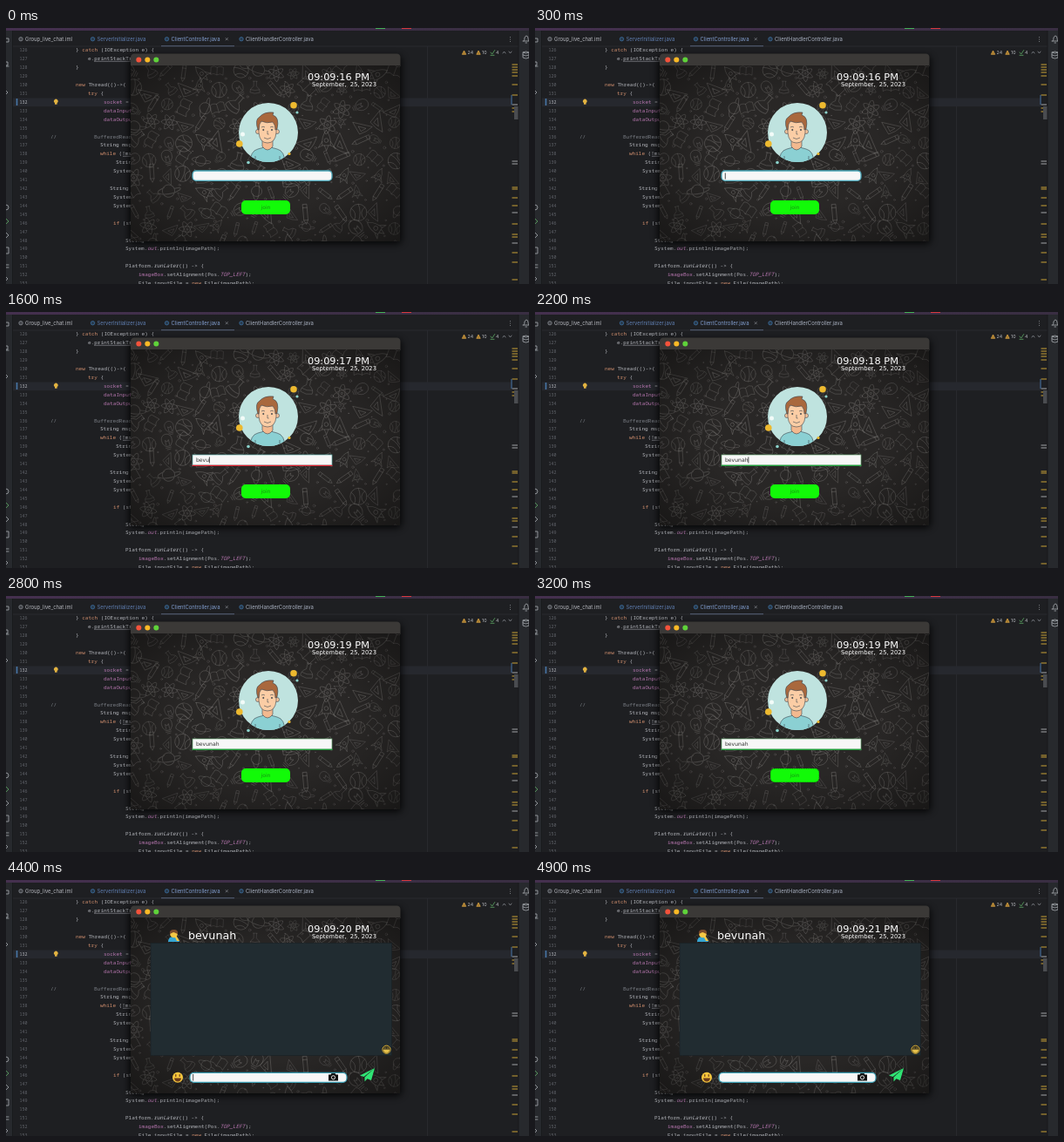
Write an HTML page that moves like this. It is 600 by 294 pixels and loops after 5 s.

```html
<!DOCTYPE html>
<html lang="en">
<head>
<meta charset="utf-8">
<title>Group chat login</title>
<style>
  html, body { margin: 0; width: 100%; height: 100%; overflow: hidden; background: #1e1f22; }
  svg { display: block; width: 600px; height: 294px; }
  text { white-space: pre; }
  .code { font: 6px "Noto Sans Mono", monospace; fill: #b4b6bc; }
  .num { font: 5px "Noto Sans Mono", monospace; fill: #62656c; text-anchor: end; }
  .current { fill: #b4b6bc; }
  .comment { fill: #7a7e85; }
  .kw { fill: #cf8e6d; }
  .field { fill: #b877b0; }
  .static { font-style: italic; fill: #b877b0; }
  .call { font-style: italic; }
  .tab { font: 5.9px Inter, sans-serif; }
  .count { font: 5.3px Inter, sans-serif; fill: #b4b6bc; }
  .app { font-family: "DejaVu Sans", sans-serif; fill: #fff; }
  .line { fill: none; stroke-linecap: round; stroke-linejoin: round; }
</style>
</head>
<body>
<svg viewBox="0 0 600 294">
  <defs>
    <linearGradient id="strip"><stop stop-color="#45304f"/><stop offset="1" stop-color="#392e42"/></linearGradient>
    <radialGradient id="vignette" r=".7"><stop offset=".45" stop-opacity="0"/><stop offset="1" stop-opacity=".4"/></radialGradient>
    <filter id="blur" x="-10%" y="-10%" width="120%" height="120%"><feGaussianBlur stdDeviation="4"/></filter>
    <clipPath id="body"><rect x="143" y="43" width="309" height="202"/></clipPath>
    <clipPath id="disc"><circle cx="301" cy="120" r="34"/></clipPath>
  </defs>

  <!-- editor -->
  <rect width="600" height="294" fill="#1e1f22"/>
  <rect width="600" height="3" fill="url(#strip)"/>
  <path d="M424 0h11v1h-11z" fill="#45b058"/>
  <path d="M454 0h11v1h-11z" fill="#d8383f"/>
  <path d="M8 21H588M483.5 21V294" stroke="#2d2f34" stroke-width=".7"/>
  <path d="M178 20.7H262" stroke="#4c5568" stroke-width="1.2"/>
  <rect x="8" y="80.5" width="572" height="9.6" fill="#26282e"/>
  <path d="M0 3H7.5V294H0ZM588 3h12V294h-12z" fill="#27292d"/>
  <path d="M7.500 3V294M588 3V294" stroke="#17181a" stroke-width=".8"/>
  <path d="M12.5 81v8" stroke="#4877a8" stroke-width="1.6"/>
  <path d="M56 86a2.300 2.300 0 1 1 2.600 0v1.800h-2.600z" fill="#e3b341"/>
  <g class="line" stroke="#a9acb2" stroke-width=".8">
    <path d="M0 12h3v4h-3M0 39h2v4h-2M0 44h3M0 72l2 2-2 2M0 203a3 3 0 0 1 0 6M0 235l3 3-3 3M0 252h3v7h-3M0 272h3M0 275h3M0 286l2 2-2 2"/>
    <path d="M0 219l3 3-3 3" stroke="#5fad65"/>
    <path d="M593 15h7M594 15q1-1 1-4q1-2 2-2q2 0 2 3q0 2 1 3M596 17h1.5"/>
    <path d="M593 28v6q3.5 2 7 0v-6q-3.5 2-7 0q3.5-2 7 0M593 31q3.5 2 7 0"/>
    <path d="M578.500 10.500v0M578.500 13v0M578.500 15.500v0"/>
  </g>
  <g class="line" stroke-width=".8">
    <path d="M523.5 30l2-4 2 4zM540 30l2-4 2 4z" stroke="#d9a343" fill="#a57a2e"/>
    <path d="M556 28l1.7 2 3-4.500M556 31.300h4" stroke="#5fad65"/>
    <path d="M570 29l1.500-2 1.500 2M577 27l1.500 2 1.500-2" stroke="#888b92"/>
  </g>
  <g class="count">
    <text x="529.5" y="30">24</text><text x="546" y="30">10</text><text x="562" y="30">4</text>
  </g>
  <g id="tabs"></g>
  <g id="marks"></g>
  <g id="code"></g>

  <!-- application window -->
  <rect x="141" y="32" width="313" height="216" rx="5" filter="url(#blur)" opacity=".8"/>
  <path d="M143 44V34q0-4.500 4.500-4.500H448q4.500 0 4.500 4.500v10z" fill="#3b3937"/>
  <circle cx="152.300" cy="36.600" r="3" fill="#f4523b"/>
  <circle cx="162.300" cy="36.600" r="3" fill="#fbb926"/>
  <circle cx="172.300" cy="36.600" r="3" fill="#5fd23a"/>
  <g clip-path="url(#body)">
    <rect x="143" y="43" width="310" height="203" fill="#292726"/>
    <g id="doodles" class="line" stroke="#969390" stroke-opacity=".34"></g>
    <rect x="143" y="43" width="310" height="203" fill="url(#vignette)"/>
  </g>
  <text id="clock" class="app" x="346" y="60.100" font-size="11.300"></text>
  <text class="app" x="351" y="67.400" font-size="6.770">September,  25, 2023</text>

  <g id="login">
    <circle cx="301" cy="120" r="34" fill="#bfe3df"/>
    <g clip-path="url(#disc)" stroke="#3b4650" stroke-width=".6" stroke-linejoin="round">
      <path d="M280 156q0-15 9-17l11-3 11 3q9 2 9 17z" fill="#8bd0d3"/>
      <path d="M294 126v10q6 8 12 0v-10z" fill="#f3b98f"/>
      <path d="M286 147v8M314 147v8" fill="none"/>
      <circle cx="289" cy="119" r="2.5" fill="#f7c59c"/><circle cx="311" cy="119" r="2.5" fill="#f7c59c"/>
      <path d="M290 108q10-5 20 0v12q-1 12-10 12t-10-12z" fill="#fbcda5"/>
      <path d="M289 117q-4-12 2-15q5-6 16-5l-1 3q8 2 5 16l-2 1q0-6-3-9q-7 2-13-1q-3 3-3 10z" fill="#a9683d"/>
      <path d="M293 114q2-1.500 4 0M303 114q2-1.500 4 0M300 118v4h1.500M296 126q4 3 8 0" fill="none"/>
      <circle cx="295.300" cy="117" r=".7" fill="#333"/><circle cx="305" cy="117" r=".7" fill="#333"/>
    </g>
    <g fill="#edb92f">
      <circle cx="330" cy="88.700" r="3.800"/><circle cx="267.800" cy="133" r="3.800"/><circle cx="325" cy="144.500" r="1.600"/>
    </g>
    <g fill="#8cd3cc"><circle cx="334" cy="97" r="1.600"/><circle cx="278" cy="154.500" r="1.800"/></g>
    <circle cx="271.500" cy="122" r="2.500" fill="#f2fbf8"/>
    <rect id="box" x="214" y="164" width="160" height="12" fill="#f7f7f7"/>
    <path id="underline" d="M213.500 176.300H374.500" stroke-width="1.300"/>
    <text id="typed" class="app" x="218" y="172.200" font-size="6.100" style="fill:#333"></text>
    <path id="caret" d="M0 166.500v7" stroke="#222" stroke-width=".8"/>
    <rect x="270" y="198" width="56" height="16" rx="5" fill="#12fa08"/>
    <rect id="focus" x="270.300" y="198.300" width="55.400" height="15.400" rx="4.700" fill="none" stroke="#0b6d0a" stroke-width=".7" stroke-dasharray="1 1"/>
    <text class="app" x="298" y="208" font-size="6" text-anchor="middle" style="fill:#179014">join</text>
  </g>

  <g id="chat">
    <rect x="166" y="72.500" width="276.500" height="129" fill="#212c31" stroke="#182125" stroke-width=".6"/>
    <path d="M186 71q0-6 6-6t7 6z" fill="#35a6d4"/>
    <circle cx="192.500" cy="62" r="4.300" fill="#f5c744"/>
    <path d="M188 62q-1-5 4.500-5t4.500 5q-4-2-5-2z" fill="#7b4a2a"/>
    <path d="M199 70l-4-7-2 1 3 6z" fill="#f5c744"/>
    <text id="user" class="app" x="209" y="68" font-size="12.700"></text>
    <circle cx="436.500" cy="194.700" r="4.600" fill="#3c3620" stroke="#d8ae36"/>
    <path d="M433 195h7q-1 3.500-3.500 3.500t-3.500-3.500zM434 193h1.500M437.500 193h1.500" fill="#e5c04b" stroke="#e5c04b" stroke-width=".7"/>
    <circle cx="197" cy="226.700" r="6" fill="#f7c63d"/>
    <path d="M193 227.500h8q-.5 4-4 4t-4-4z" fill="#6b3c1b"/>
    <path d="M194.800 223.500v2M199.200 223.500v2" stroke="#6b3c1b" stroke-width="1.200" stroke-linecap="round"/>
    <rect x="211" y="221.300" width="180" height="11" rx="4.500" fill="#f7f7f7" stroke="#3c9fb4" stroke-width="1.200"/>
    <path id="chatCaret" d="M214.700 223v7.500" stroke="#222" stroke-width=".8"/>
    <path d="M370 223.500h2.500l1-1.500h4l1 1.500h2.500v7h-11z" fill="#111"/>
    <circle cx="375.500" cy="226.800" r="2.100" fill="none" stroke="#f7f7f7" stroke-width=".9"/>
    <path d="M423 216L406 224.500l4.500 1.500zM423 216l-11.500 10.500v5l3-3.300 4.500 1.800z" fill="#2fe574"/>
  </g>
</svg>

<script>
const $ = id => document.getElementById(id);
const LOOP = 5000;
const NAME = "bevunah";
const KEY_TIMES = [1200, 1300, 1500, 1600, 1800, 1900, 2200];
const VALID_LENGTH = 5;
const CHAT_START = 3500;

// [line number, x, text]
const CODE = [
  [126, 80, "} catch (IOException e) {"], [127, 94, "e.printStackTrace();"], [128, 80, "}"],
  [130, 80, "new Thread(()->{"], [131, 94, "try {"], [132, 112, "socket = new Socket"],
  [133, 112, "dataInputStream"], [134, 112, "dataOutputStream"], [136, 51, "//"],
  [136, 101, "BufferedReader"], [137, 108, "String msg = "], [138, 108, "while (!msg.equals"],
  [139, 126, "String"], [140, 123, "System"], [142, 119, "String"], [143, 123, "System"],
  [144, 123, "System"], [146, 123, "if (st"], [148, 137, "String"],
  [149, 137, "System.out.println(imagePath);"], [151, 137, "Platform.runLater(() -> {"],
  [152, 152, "imageBox.setAlignment(Pos.TOP_LEFT);"],
  [153, 152, "File inputFile = new File(imagePath);"]
];
const STYLES = {
  kw: /^(catch|new|try|while|if)$/,
  field: /^(socket|data\w+|imageBox)$/,
  static: /^(out|TOP_LEFT)$/,
  call: /^runLater$/
};
const lineY = n => 27.3 + (n - 126) * 9.92;
const highlight = text => text.replace(/\w+/g, word => {
  const style = Object.keys(STYLES).find(k => STYLES[k].test(word));
  return style ? `<tspan class="${style}">${word}</tspan>` : word;
});

let lines = "";
for (let n = 126; n <= 153; n++)
  lines += `<text class="num" x="24.5" y="${lineY(n)}"><tspan class="${n === 132 ? "current" : ""}">${n}</tspan></text>`;
for (const [n, x, text] of CODE)
  lines += `<text class="code" x="${x}" y="${lineY(n)}"><tspan class="${n === 136 ? "comment" : ""}">${highlight(text)}</tspan></text>`;
$("code").innerHTML = lines + '<path d="M101 38.3h42M134 147.3h9" stroke="#b4b6bc" stroke-width=".5"/>';

const TABS = [
  [22, "Group_live_chat.iml", "#b4b6bc", "#85888f"], [104.5, "ServerInitializer.java", "#5f7eb0", "#3b6fa0"],
  [189.5, "ClientController.java", "#829fd0", "#3b6fa0"], [275, "ClientHandlerController.java", "#a9b1c0", "#3b6fa0"]
];
$("tabs").innerHTML = TABS.map(([x, label, color, icon]) =>
  `<circle cx="${x - 5}" cy="12.7" r="2.2" fill="${icon}" fill-opacity=".35" stroke="${icon}" stroke-width=".8"/>
   <text class="tab" x="${x}" y="14.9" fill="${color}">${label}</text>`).join("") +
  '<path d="M251.8 11.2l3 3m0-3l-3 3" stroke="#888b92" stroke-width=".7"/>';

const mark = color => y => `<path d="M580.5 ${y}h6.5" stroke="${color}"/>`;
$("marks").innerHTML =
  [42, 45, 48, 51, 55, 65, 77, 92, 96, 183, 185, 195, 204, 225, 237, 240, 258, 269, 289].map(mark("#c9a236")).join("") +
  [88, 153, 156, 212, 247].map(mark("#a3a5a8")).join("") +
  '<path d="M583 90h4.500v15h-4.500z" fill="#4a4c50"/><path d="M580 77v11" stroke="#4877a8"/>';

const ring = (rx, ry = rx, tilt = 0) => {
  const a = tilt * Math.PI / 180, x = rx * Math.cos(a), y = rx * Math.sin(a);
  const arc = `A${rx} ${ry} ${tilt} 1 1 `;
  return `M${x} ${y}${arc}${-x} ${-y}${arc}${x} ${y}`;
};
const DOODLES = [
  "M0-10Q5-4 4 5H-4Q-5-4 0-10ZM-4 1L-8 7L-4 5M4 1L8 7L4 5M-2 5L0 10L2 5" + ring(2),
  ring(6) + "M-5-2Q-14 6-6 5Q4 3 10-4Q12-8 5-4",
  "M-3 4Q-7 0-6-4A6 6 0 0 1 6-4Q7 0 3 4ZM-3 6H3M-2 8H2M-2 3V-3L0-1L2-3V3",
  ring(9, 3) + ring(9, 3, 60) + ring(9, 3, 120) + ring(1),
  "M-3-9H3M-2-9V-2Q-8 2-7 7Q0 10 7 7Q8 2 2-2V-9M-6 3Q0 5 6 3",
  "M-2-9V6L0 10L2 6V-9ZM-2-6H2M-2 6H2",
  "M-8 7Q0 9 8 7L-8-8ZM-5 5H1L-5-1Z",
  "M0-5Q-5-8-9-5V6Q-5 3 0 6Q5 3 9 6V-5Q5-8 0-5V6",
  ring(8) + "M-7-4Q-1 0-4 7M6-5Q0 0 5 6M0-8Q3 0 0 8"
];
let seed = 11;
const random = () => (seed = seed * 16807 % 2147483647) / 2147483647;
const between = (a, b) => a + (b - a) * random();
let doodles = "";
for (let row = 0; row < 11; row++)
  for (let col = 0; col < 16; col++) {
    const x = 146 + col * 20 + between(-4, 4), y = 50 + row * 20 + between(-4, 4);
    const shape = DOODLES[Math.floor(random() * DOODLES.length)];
    doodles += `<path d="${shape}" stroke-width=".8" transform="translate(${x} ${y}) rotate(${between(-70, 70)}) scale(${between(.75, 1.2)})"/>
      <circle cx="${x + 10}" cy="${y + 9}" r="${between(.4, 1.6)}" stroke-width=".6"/>`;
  }
$("doodles").innerHTML = doodles;
$("user").textContent = NAME;

const show = (id, visible) => $(id).setAttribute("display", visible ? "inline" : "none");
const setAttributes = (id, values) => {
  for (const key in values) $(id).setAttribute(key, values[key]);
};
const FIELD_STATES = {
  empty: { rx: 4, height: 11.3, stroke: "#4aa6b8", "stroke-width": 1.3 },
  invalid: { rx: 0, height: 12, stroke: "#5aa9a4", "stroke-width": .7 },
  valid: { rx: 0, height: 12, stroke: "#5f9f6a", "stroke-width": .7 }
};

function render(t) {
  $("clock").textContent = `09:09:${16 + Math.floor((t + 200) / 1000)} PM`;
  show("login", t < CHAT_START);
  show("chat", t >= CHAT_START);
  show("chatCaret", t < 3900 || (t >= 4400 && t < 4900));

  const count = KEY_TIMES.filter(time => time <= t).length;
  const state = count === 0 ? "empty" : count < VALID_LENGTH ? "invalid" : "valid";
  $("typed").textContent = NAME.slice(0, count);
  setAttributes("box", FIELD_STATES[state]);
  setAttributes("underline", { stroke: state === "valid" ? "#1f9e3a" : "#e0212f" });
  show("underline", count > 0);
  show("caret", (t >= 300 && t < 800) || (t >= 1200 && t < 2700));
  const textWidth = count && t < CHAT_START ? $("typed").getComputedTextLength() : 0;
  setAttributes("caret", { transform: `translate(${218.3 + textWidth} 0)` });
  show("focus", t >= 3200);
}

function frame() {
  render(performance.now() % LOOP);
  requestAnimationFrame(frame);
}
frame();
</script>
</body>
</html>
```
